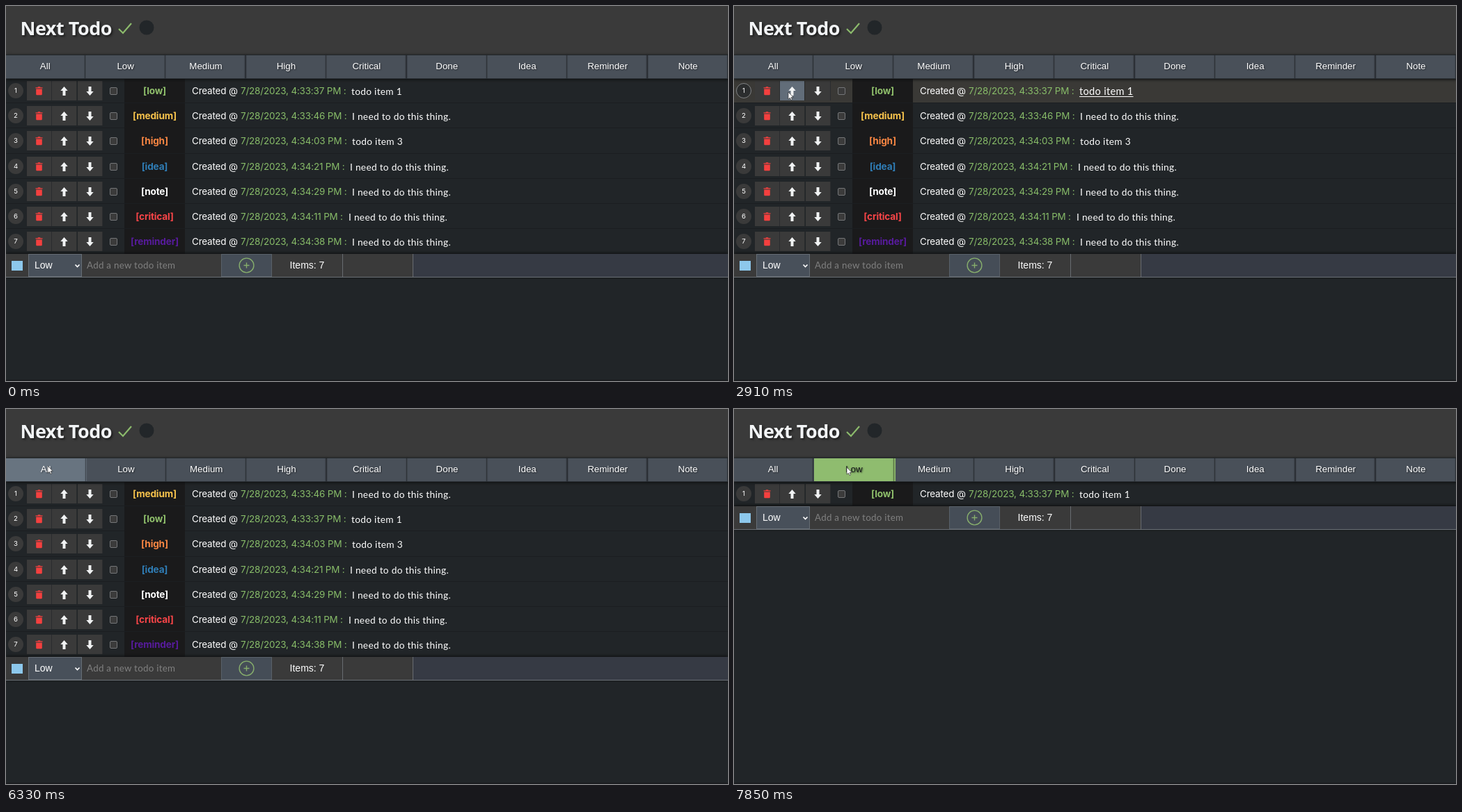
An HTML page for the animation above (8000 ms loop, 1037 px wide and 540 px high).

```html
<!DOCTYPE html>
<html lang="en">
<head>
<meta charset="utf-8">
<title>Next Todo</title>
<style>
  * { box-sizing: border-box; }
  html, body { margin: 0; width: 100%; height: 100%; overflow: hidden; background: #212528; }
  div, svg, span, h1 { position: absolute; left: 0; top: 0; white-space: nowrap; }
  #stage { position: relative; width: 1037px; height: 540px; overflow: hidden; color: #fff;
    font: 13.4px/36px Inter, sans-serif; letter-spacing: -.15px; border-bottom: 2px solid #1b1d20; }
  header { position: absolute; left: 0; top: 0; width: 1037px; height: 70px; background: #3a3a3a; }
  h1 { left: 20.5px; top: 14px; margin: 0; font: 700 27px/36px "Open Sans", sans-serif; letter-spacing: -.5px;
    color: #f2f4f6; text-shadow: 2px 2px 3px #1c1c1c; }
  #tabs { top: 70px; width: 1038.6px; height: 35px; display: flex; background: #495059; border-top: 1px solid #24282b;
    border-bottom: 1px solid #2b3035; box-shadow: 0 1px 4px #0c0d0e; z-index: 2; }
  .tab { position: relative; flex: 1 1 0; height: 33px; padding-right: 3px; text-align: center;
    font: 13.33px/32px "Liberation Sans", Arial, sans-serif; letter-spacing: 0; text-shadow: 1px 1px 2px #0008; }
  .tab::after { content: ""; position: absolute; right: 1.4px; top: 0; width: 1.4px; height: 33px;
    background: #0006; box-shadow: 0 0 2px #0006; }
  #list { top: 104px; width: 1037px; }
  .row { width: 1037px; height: 36.23px; border-bottom: 1px solid #1b1e21; }
  .num { left: 3px; top: 7px; width: 22px; height: 22px; border-radius: 50%; background: #3a3a3a;
    border: 1px solid #3a3a3a; font-size: 9.6px; line-height: 20px; text-align: center; letter-spacing: 0; }
  .btn { top: 4px; width: 35px; height: 28px; background: #3a3a3a; box-shadow: 1px 0 #2a2c2e; }
  .btn svg { left: 12px; top: 8px; width: 11px; height: 13px; fill: #f1f3f4; }
  .box { left: 149px; top: 13px; width: 11px; height: 11px; border: 1px solid #747678; border-radius: 2px; background: #3b3b3b; }
  .tag { left: 170px; width: 87px; height: 35.3px; background: #1a1a1b; text-align: center;
    font-weight: 700; font-size: 13.6px; line-height: 37px; }
  .made { left: 267px; }
  .date { left: 337px; color: #88bd69; }
  .text { font-family: Lato, sans-serif; font-size: 13.7px; line-height: 37px; letter-spacing: .3px; text-underline-offset: 2px; }
  #form { width: 1037px; height: 34px; background: #363a44; border-bottom: 1px solid #6b7076;
    box-shadow: 0 -1px 4px #0c0d0e; line-height: 33px; }
  .cell { height: 33px; background: #3a3a3a; font: 14px/33px "Liberation Sans", Arial, sans-serif; letter-spacing: 0; }
  #click { width: 18px; height: 18px; margin: -9px; border-radius: 50%; background: #dcdc14; opacity: .85; z-index: 4; }
  #cursor { width: 9px; height: 13px; z-index: 5; overflow: visible; }
</style>
</head>
<body>
<div id="stage">
  <header>
    <h1>Next Todo</h1>
    <svg width="230" height="70" fill="none">
      <path d="M162 33l6 6L180 25" stroke="#8cbb6c" stroke-width="2.2"/>
      <circle cx="202" cy="31" r="10.5" fill="#222629"/>
    </svg>
  </header>
  <div id="list"></div>
  <div id="tabs"></div>
  <div id="form">
    <div class="cell" style="width:32px"></div>
    <div style="left:7.500px;top:10px;width:16.500px;height:14px;background:#8dc8ec"></div>
    <div class="cell" style="left:32px;width:77px;padding-left:8px;background:#48505a;border:1px solid #666d75;line-height:31px">Low</div>
    <div class="cell" style="left:109px;width:200px;padding-left:7px;color:#808080;font-family:Lato,sans-serif;font-size:13.3px;letter-spacing:.3px">Add a new todo item</div>
    <div class="cell" style="left:309px;width:73px;background:#454d57;border:1px solid #596169"></div>
    <div class="cell" style="left:382px;width:102px;text-align:center;border-right:1px solid #686c70">Items: 7</div>
    <div class="cell" style="left:484px;width:101px;border-right:1px solid #686c70"></div>
    <svg width="400" height="34" fill="none">
      <path d="M99.5 15.5l3 3 3-3" stroke="#fff" stroke-width="1.6"/>
      <g stroke="#86ad6c" stroke-width="1.4"><circle cx="345.5" cy="16.5" r="10.4"/><path d="M341.5 16.5h8m-4-4v8"/></g>
    </svg>
  </div>
  <div id="click"></div>
  <svg id="cursor"><path d="M0 0V10.2L2.4 8.2 4 11.6 5.6 10.9 4.1 7.6H7.2Z" fill="#fff" stroke="#222" stroke-width=".6"/></svg>
</div>
<script>
const LOOP = 8000, ROW = 36.23, TOP = 104, PITCH = 115.4, LAG = 60, FADE = 150;
const $ = id => document.getElementById(id);
const thing = 'I need to do this thing.';

// tag, colour, time, text, text x
const items = [
  ['low', '#8fbf6b', '4:33:37', 'todo item 1', 496],
  ['medium', '#f6c24c', '4:33:46', thing, 497],
  ['high', '#f98643', '4:34:03', 'todo item 3', 497],
  ['idea', '#2f7db6', '4:34:21', thing, 494],
  ['note', '#ffffff', '4:34:29', thing, 497],
  ['critical', '#f84548', '4:34:11', thing, 492],
  ['reminder', '#571b9c', '4:34:38', thing, 497]
];

// start, end, steps, x, y, eased
const moves = [
  [310, 640, 6, 539, 396, 0],
  [1110, 1310, 4, 440, 305, 0],
  [1376, 1376, 1, 330, 222, 0],
  [1440, 1710, 5, 250, 160, 1],
  [1970, 2710, 12, 76, 124, 1],
  [2910, 3440, 9, 121, 122, 1],
  [4450, 4720, 5, 87, 123, 1],
  [5920, 6330, 7, 60, 82, 1],
  [7060, 7460, 7, 162, 84, 1]
];
const clicks = [[3790, 3980], [5050, 5250], [6530, 6730], [7660, 7850]];

function cursorAt(t) {
  let x = 960, y = 550;
  for (const [a, b, n, tx, ty, eased] of moves) {
    if (t < a) break;
    const k = n > 1 ? Math.floor((t - a) / (b - a) * (n - 1) + .01) : 0;
    let p = Math.min(1, (k + 1) / n);
    if (eased) p = p * p * (3 - 2 * p);
    x += (tx - x) * p;
    y += (ty - y) * p;
  }
  return { x, y };
}

function hit(t) {
  if (t < 310) return {};
  const { x, y } = cursorAt(t);
  if (y > 71 && y < TOP) return { tab: Math.floor(x / PITCH) };
  const row = Math.floor((y - TOP) / ROW);
  const inBtn = x > 30 && x < 138 && Math.abs(y - TOP - (row + .5) * ROW) < 14;
  return { row, btn: inBtn ? Math.floor((x - 30) / 36) : -1 };
}

const icons = [
  '<path fill="#f4403f" d="M.5 1.2H3.5L4 .2H7L7.5 1.2H10.5V2.5H.5ZM1.2 3.4H9.8V11Q9.8 12.2 8.6 12.2H2.4Q1.2 12.2 1.2 11Z"/>',
  '<path d="M5.5 0L10.7 6H7.5V13H3.5V6H.3Z"/>',
  '<path d="M5.5 13L10.7 7H7.5V0H3.5V7H.3Z"/>'
];

function rowHtml(id, i) {
  const [tag, color, time, text, x] = items[id];
  const buttons = icons.map((svg, b) => `<div class="btn" style="left:${30 + 36.3 * b}px"><svg>${svg}</svg></div>`).join('');
  return `<div class="row" style="top:${i * ROW}px"><div class="num">${i + 1}</div>${buttons}
    <div class="box"></div><div class="tag" style="color:${color}">[${tag}]</div><span class="made">Created @</span>
    <span class="date">7/28/2023, ${time} PM :</span><span class="text" style="left:${x}px">${text}</span></div>`;
}

$('tabs').innerHTML = ['All', 'Low', 'Medium', 'High', 'Critical', 'Done', 'Idea', 'Reminder', 'Note']
  .map(name => `<div class="tab">${name}</div>`).join('');
const tabs = [...document.querySelectorAll('.tab')];
const mix = (over, base, w) => `color-mix(in srgb, ${over} ${w * 100}%, ${base})`;

let shown = '', rows = [];
function setList(order) {
  if (order.join() === shown) return;
  shown = order.join();
  $('list').innerHTML = order.map(rowHtml).join('');
  rows = [...document.querySelectorAll('.row')].map(el => ({
    el, num: el.querySelector('.num'), text: el.querySelector('.text'), btns: el.querySelectorAll('.btn')
  }));
  $('form').style.top = TOP + order.length * ROW - .4 + 'px';
}

function draw(t) {
  setList(t < 3980 ? [0, 1, 2, 3, 4, 5, 6] : t < 7850 ? [1, 0, 2, 3, 4, 5, 6] : [0]);

  // Hover lags the cursor and fades over a short window.
  const now = hit(t - LAG), trail = [];
  for (let d = 0; d < FADE; d += 15) trail.push(hit(t - LAG - d));
  const weight = test => trail.filter(test).length / trail.length;

  rows.forEach((r, i) => {
    const w = weight(h => h.row === i), on = now.row === i;
    r.el.style.background = `rgba(58,57,54,${w})`;
    r.text.style.fontSize = 13.7 + .9 * w + 'px';
    r.text.style.textDecoration = on ? 'underline' : 'none';
    r.num.style.background = mix('#2b2d2e', '#3a3a3a', w);
    r.num.style.borderColor = on ? '#808284' : 'transparent';
    r.btns.forEach((b, j) => {
      b.style.background = mix('#626d79', '#3a3a3a', weight(h => h.row === i && h.btn === j));
    });
  });

  tabs.forEach((tab, i) => {
    const w = weight(h => h.tab === i);
    tab.style.background = mix(i === 1 ? '#8fbc6f' : '#687480', '#495059', w);
    tab.style.color = i === 1 ? mix('#15181a', '#ffffff', w) : '#fff';
    tab.style.paddingLeft = w + 'px';
  });

  const { x, y } = cursorAt(t);
  for (const id of ['cursor', 'click']) {
    $(id).style.left = x + 'px';
    $(id).style.top = y + 'px';
  }
  $('cursor').style.display = t < 310 ? 'none' : 'block';
  $('click').style.display = clicks.some(([a, b]) => t >= a && t < b) ? 'block' : 'none';
}

const start = performance.now();
function tick() {
  draw((performance.now() - start) % LOOP);
  requestAnimationFrame(tick);
}
tick();
</script>
</body>
</html>
```
